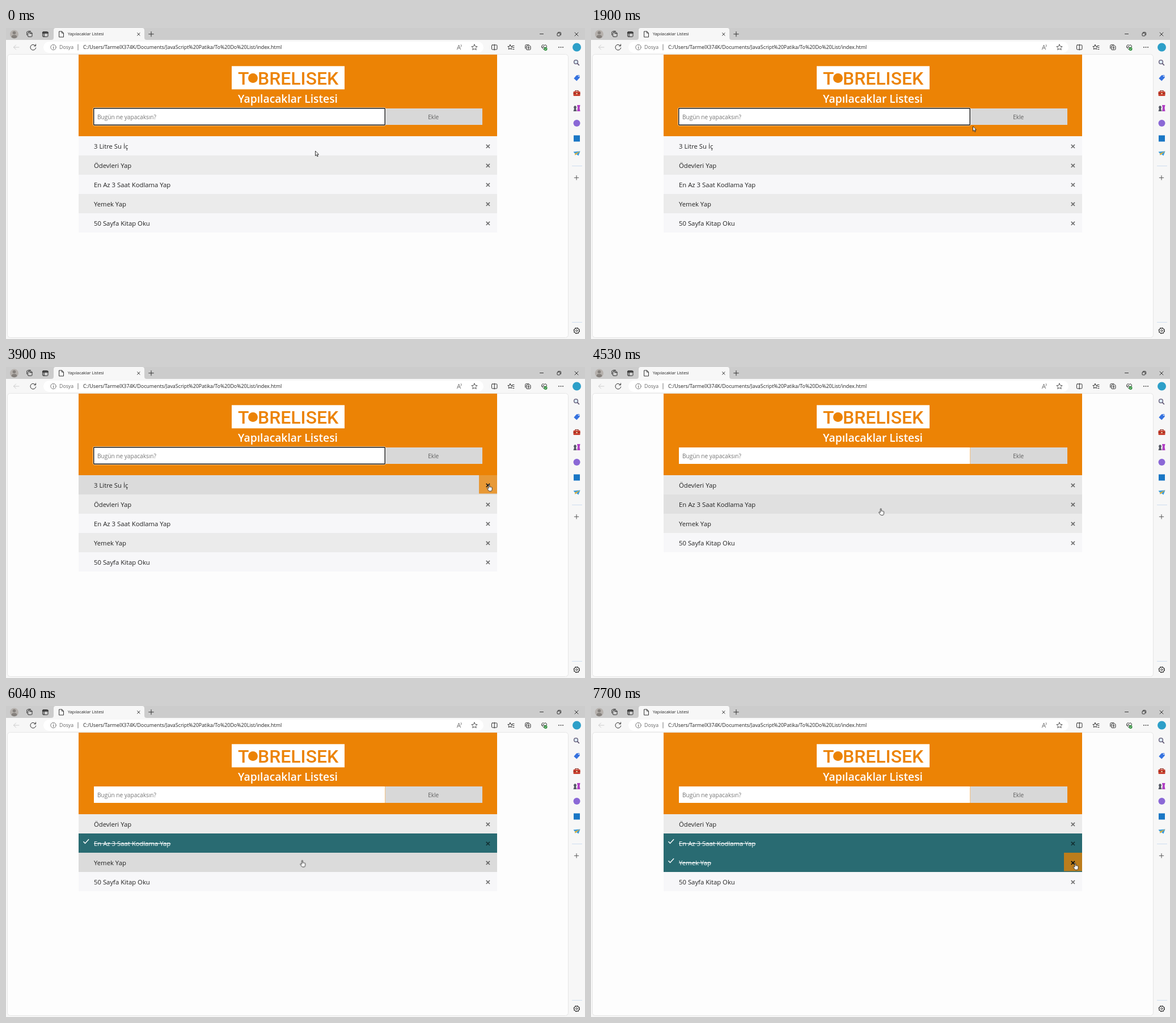
An HTML page for the animation above (8 s loop, 1021x549 px).

```html
<!DOCTYPE html>
<html lang="tr">
<head>
<meta charset="utf-8">
<title>Yapılacaklar Listesi</title>
<style>
  html, body { margin: 0; width: 100%; height: 100%; overflow: hidden; background: #f7f7f7; }
  svg { display: block; width: 1021px; height: 549px; }
  text { font-family: "Open Sans", "Noto Sans", sans-serif; fill: #222; }
  .line { fill: none; stroke: #333; stroke-width: 1; stroke-linecap: round; stroke-linejoin: round; }
  .task text { font-size: 11.32px; }
  .tick { fill: none; stroke: #fff; stroke-width: 1.4; }

  .odd { fill: #f7f7f9; }
  .even { fill: #ebebeb; }

  /* 1% = 80 ms */
  .ring { animation: ring 8s step-end infinite; }
  .caret { animation: caret 8s step-end infinite; }
  .list { animation: shift 8s step-end infinite; }
  .water rect.odd { animation: water 8s infinite; }
  .homework rect.even { animation: homework 8s infinite; }
  .code rect.odd { animation: code 8s infinite; }
  .cook rect.even { animation: cook 8s infinite; }
  .code text { animation: code-text 8s infinite; }
  .cook text { animation: cook-text 8s infinite; }
  .code .tick { animation: code-tick 8s step-end infinite; }
  .cook .tick { animation: cook-tick 8s step-end infinite; }
  .hot { opacity: 0; }
  .water .hot { animation: water-hot 8s step-end infinite; }
  .homework .hot { animation: homework-hot 8s step-end infinite; }
  .cook .hot { animation: cook-hot 8s step-end infinite; }
  .cursor { animation: path 8s ease-in-out infinite; }
  .arrow { animation: arrow 8s step-end infinite; }
  .hand { animation: hand 8s step-end infinite; }

  @keyframes ring { 0% { opacity: 1 } 50%, 100% { opacity: 0 } }
  @keyframes caret {
    0%, 9.51%, 22.59%, 35.66%, 48.74%, 100% { opacity: 0 }
    2.98%, 16.05%, 29.13%, 42.2% { opacity: 1 }
  }
  @keyframes shift { 0% { transform: none } 51.25%, 100% { transform: translateY(-34px) } }
  @keyframes water {
    0%, .5%, 8.1%, 42.3% { fill: #f7f7f9 }
    3%, 5.6%, 44.8%, 100% { fill: #dbdbdb }
  }
  @keyframes homework {
    0%, 51.25%, 57.8%, 100% { fill: #ebebeb }
    53.75%, 55.3% { fill: #dbdbdb }
  }
  @keyframes code {
    0%, 55.3% { fill: #f7f7f9 }
    57.8%, 66% { fill: #dbdbdb }
    68.5%, 100% { fill: #296b72 }
  }
  @keyframes cook {
    0%, 71.25% { fill: #ebebeb }
    73.75%, 80.4% { fill: #dbdbdb }
    82.9%, 100% { fill: #296b72 }
  }
  @keyframes code-text {
    0%, 65.99% { fill: #222; text-decoration: none }
    66% { fill: #222; text-decoration: line-through }
    68.5%, 100% { fill: #fff; text-decoration: line-through }
  }
  @keyframes cook-text {
    0%, 80.39% { fill: #222; text-decoration: none }
    80.4% { fill: #222; text-decoration: line-through }
    82.9%, 100% { fill: #fff; text-decoration: line-through }
  }
  @keyframes code-tick { 0% { opacity: 0 } 66%, 100% { opacity: 1 } }
  @keyframes cook-tick { 0% { opacity: 0 } 80.4%, 100% { opacity: 1 } }
  @keyframes water-hot { 0% { opacity: 0 } 43.2%, 100% { opacity: .75 } }
  @keyframes homework-hot { 0%, 52.3%, 100% { opacity: 0 } 51.25% { opacity: .75 } }
  @keyframes cook-hot { 0% { opacity: 0 } 94.6%, 100% { opacity: .75 } }
  @keyframes path {
    0%, .4% { transform: translate(545px, 217px) }
    13.25%, 22.5% { transform: translate(669px, 176px) }
    23.75%, 30.9% { transform: translate(673px, 173.5px) }
    38.4%, 40.9% { transform: translate(812px, 181px) }
    47%, 51.7% { transform: translate(852px, 207.5px); animation-timing-function: ease-in }
    55.3% { transform: translate(585px, 225px); animation-timing-function: linear }
    56.6% { transform: translate(511.5px, 250px); animation-timing-function: ease-out }
    60.9%, 68.2% { transform: translate(494.5px, 244px) }
    75.5%, 89.25% { transform: translate(522.5px, 272.5px) }
    96.25%, 100% { transform: translate(854px, 277.5px) }
  }
  @keyframes arrow { 0%, 5.6% { opacity: 1 } .5%, 42.3%, 100% { opacity: 0 } }
  @keyframes hand { 0%, 5.6% { opacity: 0 } .5%, 42.3%, 100% { opacity: 1 } }
</style>
</head>
<body>
<svg viewBox="0 0 1021 549">
  <defs>
    <path id="x" d="M846.8 14.8l6.2 6.2m0-6.2l-6.2 6.2" stroke="#000" stroke-width="1.7"/>
    <g id="close">
      <use href="#x" opacity=".55"/>
      <g class="hot"><rect x="834" width="32" height="32.5" fill="#ed8300"/><use href="#x"/></g>
    </g>
    <path id="tick" d="M136.5 14.2l3 3.3 6.6-7.3"/>
    <clipPath id="below"><rect x="128" y="191" width="738" height="200"/></clipPath>
  </defs>

  <!-- window frame -->
  <rect width="1021" height="549" fill="#f7f7f7"/>
  <rect width="1021" height="21" fill="#cccccc"/>
  <path d="M80 21q4 0 4-4V4q0-4 4-4h152q4 0 4 4v13q0 4 4 4z" fill="#f7f7f7"/>
  <circle cx="14.5" cy="11" r="7.5" fill="#b5b0ac"/>
  <circle cx="14.5" cy="8.5" r="2.8" fill="#85807c"/>
  <path d="M9.5 16.3q0-4 5-4t5 4q-5 4-10 0z" fill="#85807c"/>
  <g class="line">
    <rect x="38.5" y="8" width="7.5" height="7.5" rx="1.5"/>
    <path d="M36.7 12.5V8q0-2 2-2h5M42 9.5h4M40 5.5h3"/>
    <rect x="64.5" y="6.5" width="9.5" height="9" rx="1.5"/>
    <path d="M64.5 8h9.500M64.500 9h9.500M67 9.500v6" stroke-width="1.3"/>
    <path d="M94 6h4.500l3 3v7H94zM98.500 6v3h3"/>
    <path d="M231.500 8.700l4.600 4.600m0-4.600l-4.600 4.600M256 6.500v8.500m-4.250-4.250h8.500"/>
    <path d="M941.500 10.500h6M1003 8l6 6m0-6l-6 6"/>
    <rect x="972" y="9" width="5" height="5" rx="1"/>
    <path d="M973.700 7.500h3.300q1.500 0 1.500 1.500v3.300"/>
  </g>
  <text x="109" y="13.300" font-size="7.35">Yapılacaklar Listesi</text>

  <!-- toolbar -->
  <rect x="66" y="24" width="776" height="20" rx="10" fill="#fff"/>
  <path class="line" d="M23 34H13.500m4-4l-4 4 4 4" style="stroke:#ccc"/>
  <g class="line">
    <path d="M52 31.500a4.900 4.900 0 1 0 .7 3.500M52.500 28.800v3h-3"/>
    <circle cx="83.500" cy="34" r="4.700" style="stroke:#777"/>
    <path d="M83.500 33.500v3M83.500 31.500v.1" style="stroke:#666"/>
    <path d="M127 29v10" style="stroke:#777"/>
    <path d="M795.500 38l3-8 3 8m-5-2.700h4M802.500 29.500q1.500 1.500 0 3.500" stroke-width=".9" style="stroke:#666"/>
    <path id="star" d="M826 29l1.500 3.300 3.600.4-2.700 2.400.8 3.500-3.200-1.800-3.200 1.800.8-3.500-2.700-2.400 3.600-.4z" style="stroke:#555"/>
    <rect x="856.500" y="30" width="9.500" height="8" rx="1.200"/>
    <path d="M861.250 29v10"/>
    <path d="M889 29.500l1.300 2.800 2.700.4-2 2 .3 3-2.300-1.400-2.600 1.400.5-3-2-2 2.800-.4zM893 31.500h3M893.500 34.500h2.500M893.500 37.500h2.500"/>
    <rect x="917.500" y="31.500" width="7.500" height="7" rx="1.500"/>
    <path d="M915.700 36v-4.500q0-2 2-2h4.500M921.250 33v4m-2-2h4"/>
    <path d="M949 38.500l-4-4q-1.500-3 1-4.500 2-.7 3 1 1-1.700 3-1 2.500 1.500 1 4.500M945 34h2l1-1.500 1.500 3 1-1.500"/>
  </g>
  <circle cx="951.500" cy="37" r="3" fill="#2f8f3c"/>
  <path d="M950 37l1.100 1.100 1.900-2.100" fill="none" stroke="#fff" stroke-width=".8"/>
  <g fill="#333"><circle cx="975" cy="34" r=".9"/><circle cx="978.500" cy="34" r=".9"/><circle cx="982" cy="34" r=".9"/></g>
  <text x="94" y="37.300" font-size="8.75" style="fill:#666">Dosya</text>
  <text x="136" y="37.300" font-size="8.88">C:/Users/TarmelX374K/Documents/JavaScript%20Patika/To%20Do%20List/index.html</text>

  <!-- sidebar -->
  <circle cx="1006.500" cy="34" r="7.500" fill="#2d9fc8"/>
  <circle cx="1005" cy="60" r="3.400" fill="#dcebf7" stroke="#5c5470" stroke-width="1.300"/>
  <path d="M1007.500 62.500l3.300 3.500" stroke="#5c5470" stroke-width="1.800"/>
  <path d="M1006 83.500l5-.5.800 4.500-5.500 6-5-4.500z" fill="#3572df"/>
  <circle cx="1009.800" cy="85" r=".9" fill="#fff"/>
  <path d="M1004 112.500v-2h5v2" fill="none" stroke="#8c2b20" stroke-width="1.200"/>
  <rect x="1000.500" y="112" width="12" height="8" rx="1.200" fill="#c8402f"/>
  <path d="M1000.500 115.500h12" stroke="#7e2219"/>
  <rect x="1005.300" y="114.500" width="2.400" height="2.500" fill="#f0c9a0"/>
  <path d="M1000.500 147l1.500-4.500q-2.500-4 1.500-5.500 4 1.500 1.500 5.500l1.500 4.500z" fill="#555a66"/>
  <path d="M1007 147l1-6-1-5h5.500l-1 5 1 6z" fill="#b03fc4"/>
  <circle cx="1006.500" cy="168" r="6" fill="#8a68d6"/>
  <rect x="1001" y="189.500" width="11" height="11" fill="#1976c5"/>
  <path d="M1000.500 218.500l12-1-3 8-3.500-2.500-2.500 1.500-.5-3z" fill="#3a9bdc"/>
  <path d="M1003 221.500l9.500-4-6.500 5.500-2.500 1.500z" fill="#e2b33c"/>
  <path d="M998 243.500h18M998 519.500h18" stroke="#cdddf0"/>
  <path class="line" d="M1006 260.500v7.500m-3.750-3.750h7.500" style="stroke:#555"/>
  <g class="line">
    <circle cx="1006.300" cy="534.300" r="4.500" stroke-width="1.200"/>
    <circle cx="1006.300" cy="534.300" r="5.100" stroke-width="1.200" stroke-dasharray="2 2" stroke-linecap="butt"/>
    <circle cx="1006.300" cy="534.300" r="1.600"/>
  </g>

  <!-- page -->
  <rect x="2.500" y="46.500" width="989" height="500" rx="5" fill="#fdfdfd" stroke="#e6e6e6"/>
  <rect x="128" y="47" width="738" height="144.500" fill="#ec8305"/>
  <rect x="398" y="67.300" width="199" height="41" fill="#fff"/>
  <g style="font-weight:700">
    <text x="409" y="100" font-size="32" style="font-family:Roboto,sans-serif;font-weight:500;fill:#ec8305">T</text>
    <text x="444" y="100" font-size="32" style="font-family:Roboto,sans-serif;font-weight:500;fill:#ec8305">BRELISEK</text>
  </g>
  <circle cx="435.500" cy="88.500" r="8.500" fill="#ec8305"/>
  <text x="497" y="131.700" font-size="19.300" text-anchor="middle" style="fill:#fff;font-weight:600">Yapılacaklar Listesi</text>

  <rect x="155" y="142" width="513.500" height="29" fill="#fff"/>
  <rect x="669" y="142" width="171" height="29" fill="#d8d8d8"/>
  <g class="ring" fill="none">
    <rect x="153.700" y="140.700" width="515.600" height="31.600" rx="2" stroke="#fff" stroke-width=".8"/>
    <rect x="154.700" y="141.700" width="513.600" height="29.600" rx="1.200" stroke="#151515" stroke-width="1.400"/>
  </g>
  <text x="161" y="161" font-size="10.100" style="fill:#757575">Bugün ne yapacaksın?</text>
  <rect class="caret" x="161.500" y="150" width=".9" height="14" fill="#222"/>
  <text x="753.700" y="161" font-size="10.100" text-anchor="middle" style="fill:#606060">Ekle</text>

  <g clip-path="url(#below)">
    <g class="list">
      <g class="task water" transform="translate(0 191)">
        <rect class="odd" x="128" width="738" height="34"/>
        <text x="155" y="21.800">3 Litre Su İç</text>
        <use href="#x" opacity=".55"/>
        <g class="hot"><rect x="834" width="32" height="32.500" fill="#ed8300"/><use href="#x"/></g>
      </g>
      <g class="task homework" transform="translate(0 225)">
        <rect class="even" x="128" width="738" height="34"/>
        <text x="155" y="21.800">Ödevleri Yap</text>
        <use href="#x" opacity=".55"/>
        <g class="hot"><rect x="834" width="32" height="32.500" fill="#ed8300"/><use href="#x"/></g>
      </g>
      <g class="task code" transform="translate(0 259)">
        <rect class="odd" x="128" width="738" height="34"/>
        <text x="155" y="21.800">En Az 3 Saat Kodlama Yap</text>
        <use class="tick" href="#tick"/>
        <use href="#x" opacity=".55"/>
      </g>
      <g class="task cook" transform="translate(0 293)">
        <rect class="even" x="128" width="738" height="34"/>
        <text x="155" y="21.800">Yemek Yap</text>
        <use class="tick" href="#tick"/>
        <use href="#x" opacity=".55"/>
        <g class="hot"><rect x="834" width="32" height="32.500" fill="#ed8300"/><use href="#x"/></g>
      </g>
      <g class="task" transform="translate(0 327)">
        <rect class="odd" x="128" width="738" height="34"/>
        <text x="155" y="21.800">50 Sayfa Kitap Oku</text>
        <use href="#x" opacity=".55"/>
      </g>
    </g>
  </g>

  <g class="cursor" fill="#fff" stroke="#222" stroke-width=".9" stroke-linejoin="round">
    <path class="arrow" d="M.5 0v8.600l2-1.800 1.400 3.100 1.300-.6-1.400-3h2.700z"/>
    <path class="hand" d="M-1 7V1q0-1 .9-1t.9 1v3.300q.9-.5 1.500.2.9-.5 1.500.3 1.200-.3 1.400.9v2.800q0 3-2.200 3.200H.8Q-.6 11.500-1.500 10L-3.400 7.300q-.6-1.200.5-1.300.9 0 1.900 1z"/>
  </g>
</svg>
</body>
</html>
```
